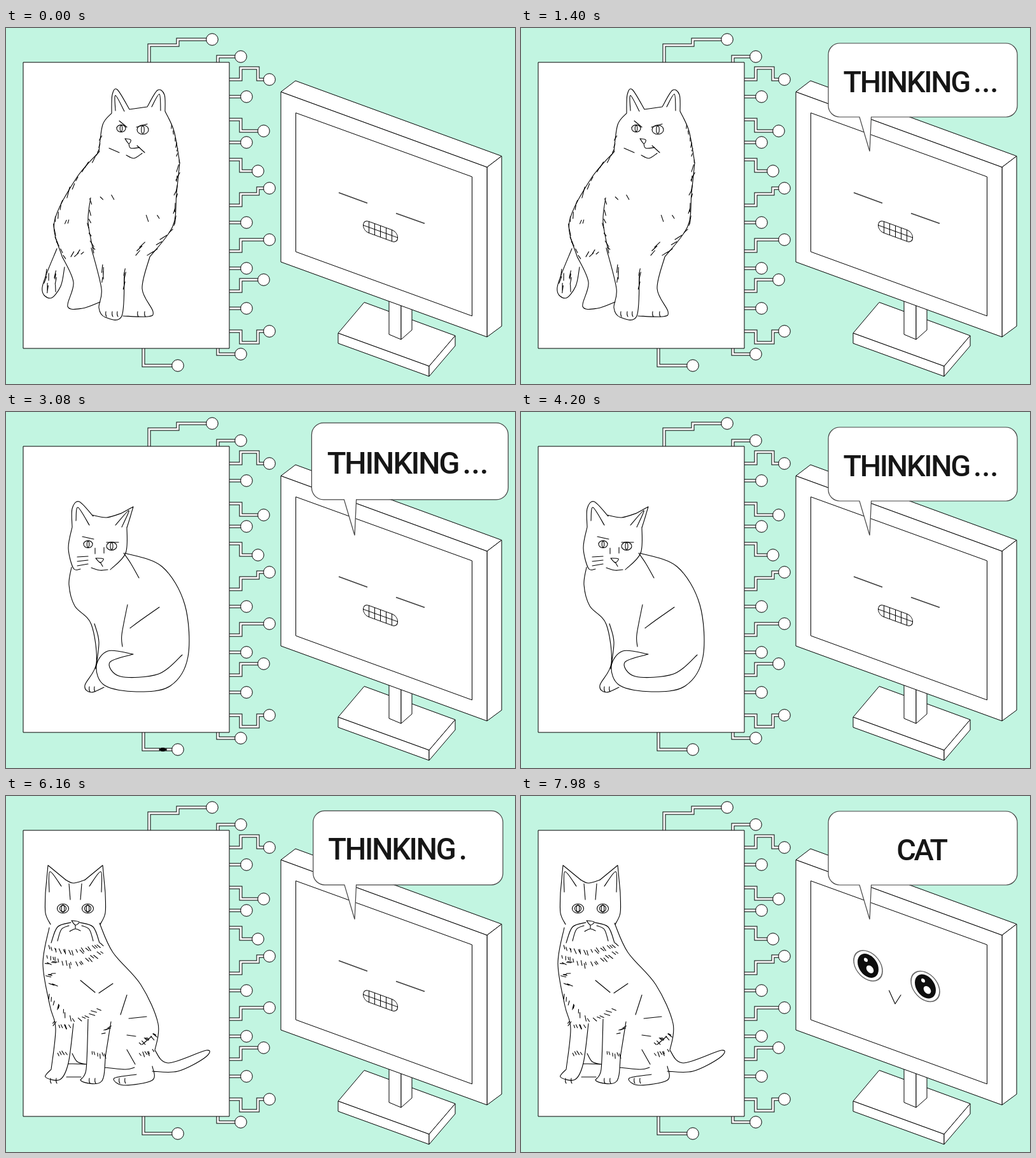
Animation of 800x560 px, one loop 8000 ms. Source, as an HTML page:

```html
<!DOCTYPE html>
<html lang="en">
<head>
<meta charset="utf-8">
<title>Thinking computer</title>
<style>
  html, body { margin: 0; width: 100%; height: 100%; overflow: hidden; background: #c2f5e1; }
  svg { display: block; width: 800px; height: 560px; }
  .ink { fill: none; stroke: #000; stroke-width: 1.1; stroke-linecap: round; stroke-linejoin: round; }
  .solid { fill: #fff; stroke: #000; stroke-width: 1; stroke-linejoin: round; }
  text { font: 500 47px Roboto, "Liberation Sans", sans-serif; fill: #161616; }
</style>
</head>
<body>
<svg viewBox="0 0 800 560">
  <rect width="800" height="560" fill="#c2f5e1"/>
  <g id="circuits"></g>
  <rect class="solid" x="27" y="54" width="324" height="450"/>
  <g id="cats" class="ink"></g>

  <g class="solid">
    <path d="M522 480L563 431.500L706 484L665 532Z"/>
    <path d="M522 480V496L665 548V532Z"/>
    <path d="M706 484V500L665 548V532Z"/>
    <path d="M602 425V482L621 490V430Z"/>
    <path d="M621 430V490L638 475V440Z"/>
    <path d="M432 100.500L455 83L779 201.500L756 219Z"/>
    <path d="M756 219L779 201.500V469L756 486Z"/>
    <path d="M432 100.500L756 219V486L432 368Z"/>
    <path d="M455.500 133.500L732.500 234V453L455.500 352Z"/>
  </g>

  <g id="asleep">
    <path d="M523 259L568 275.500M613 291.500L658 307.500" stroke="#3c3c3c" stroke-width="1.600"/>
    <g id="mouth" class="solid">
      <rect x="-27" y="-9" width="54" height="18" rx="8.500"/>
      <path d="M-27 0H27M-18 -9V9M-9 -9V9M0 -9V9M9 -9V9M18 -9V9"/>
    </g>
  </g>
  <g id="awake">
    <g id="eyes"></g>
    <path class="ink" d="M578.500 306L588 327L597 313"/>
  </g>

  <g id="bubble">
    <path fill="#fff" stroke="#444" stroke-width="1.200" d="M501 24H762a18 18 0 0 1 18 18V122a18 18 0 0 1 -18 18H550.500L548 194L532 140H501a18 18 0 0 1 -18 -18V42a18 18 0 0 1 18 -18Z"/>
    <g id="thinking">
      <text x="506.500" y="100.500" letter-spacing="-2.300">THINKING</text>
      <text id="dots" x="711" y="100.500"></text>
    </g>
    <text id="answer" x="629" y="100.500" text-anchor="middle" letter-spacing="-3.500">CAT</text>
  </g>
</svg>
<script>
const $ = id => document.getElementById(id);
const show = (node, on) => { node.style.display = on ? '' : 'none'; };
const svgNode = (tag, attrs) => {
  const node = document.createElementNS('http://www.w3.org/2000/svg', tag);
  for (const key in attrs) node.setAttribute(key, attrs[key]);
  return node;
};

let seed = 7;
const random = () => (seed = seed * 16807 % 2147483647) / 2147483647;

// Smooth line through a few key points.
function curve(text) {
  const n = text.trim().split(/\s+/).map(Number);
  const p = n.flatMap((x, i) => i % 2 ? [] : [[x, n[i + 1]]]);
  let d = `M${p[0]}`;
  for (let i = 0; i < p.length - 1; i++) {
    const a = p[i - 1] || p[i], b = p[i], c = p[i + 1], e = p[i + 2] || c;
    d += `C${b.map((v, k) => v + (c[k] - a[k]) / 6)} ${c.map((v, k) => v - (e[k] - b[k]) / 6)} ${c}`;
  }
  return d;
}
const draft = d => `<path d="${d}"/>`;
const lines = text => draft(text.split('|').map(curve).join(''));

// Short hairs growing along a line, turned from its direction by an angle.
function hairs(text, gap, size, turn) {
  let d = '';
  for (const stroke of text.split('|')) {
    const path = svgNode('path', { d: curve(stroke) }), length = path.getTotalLength();
    for (let s = gap * random(); s < length; s += gap * (.6 + .8 * random())) {
      const a = path.getPointAtLength(s), b = path.getPointAtLength(s + 1);
      const angle = Math.atan2(b.y - a.y, b.x - a.x) + turn * Math.PI / 180 + random() * .4 - .2;
      const r = size * (.6 + .6 * random());
      d += `M${a.x + 4 * random() - 2} ${a.y + 4 * random() - 2}l${r * Math.cos(angle)} ${r * Math.sin(angle)}`;
    }
  }
  return draft(d);
}
const oval = (x, y, rx, ry) => `<ellipse cx="${x}" cy="${y}" rx="${rx}" ry="${ry}"/>`;
const eye = (x, y, r) => oval(x, y, r, r * .8) + oval(x, y, r * .25, r * .65);
const toes = (y, ...xs) => draft(xs.map(x => `M${x} ${y}q-1 5 1 8`).join(''));

function longhairCat() {
  const back = '147 194 110 237 76 305 88 359', flank = '273 212 268 260 262 312 226 360';
  const cheeks = '150 162 146 194|258 148 267 180 273 212', chest = '133 267 129 305 138 354';
  return lines(`166 134 167 105 175 97 194 128|172 130 172 106 186 131|222 124 238 98 249 105 250 131
    |229 124 241 104 243 130|194 128 208 126 222 124|166 134 152 152 146 194|250 131 264 162 273 212
    |178 146 190 156|205 156 222 151|187 174 196 176 193 182 187 174|193 182 196 189 210 188
    |189 200 201 205 214 197|162 189 178 196|206 185 218 196`)
    + lines(`${back}|${flank}|${chest}|88 359 106 400 97 438 120 441 148 431|80 347 57 408 70 425 86 406 92 376
    |134 346 150 410 146 440 156 455 182 453 186 385|226 360 214 410 231 446 222 454 184 453`)
    + hairs(back, 11, 10, -14) + hairs(flank, 10, 12, 12) + hairs(cheeks, 9, 7, 20) + hairs(chest, 13, 9, -20)
    + hairs('222 330 207 354|150 366 153 392|186 372 188 404|66 380 64 412|78 378 78 408', 7, 11, 8)
    + hairs('98 359 126 356|90 312 100 306', 5, 8, -45) + hairs('147 266 172 262|206 294 240 294', 14, 9, 65)
    + toes(446, 157, 167, 175, 207, 218) + eye(181, 158, 7) + eye(215, 160, 9);
}

function shorthairCat() {
  const whiskers = [0, 1, 2].map(i => `112 ${228 + 7 * i} 129 ${227 + 6 * i}`).join('|');
  return lines(`104 181 104 152 115 141 137 164|110 171 113 150 131 178|135 162 158 166 182 159|180 160 200 149
    |200 149 195 166 190 182|172 178 193 155 182 181|104 181 98 214 106 246 117 247|190 181 188 222 164 248
    |134 245 148 249 160 248|120 196 138 200|158 205 177 205|141 230 153 231 148 237 141 230
    |148 236 152 243|140 214 140 223|154 213 154 222|${whiskers}`)
    + lines(`103 244 99 272 108 305 134 334 142 395 124 430 134 441 154 433|139 333 146 362 141 404
    |187 222 245 243 281 303 286 385 258 431 205 440 155 430 142 400 160 376 200 381
    |200 381 163 394 180 416 240 412 277 382|185 222 196 238 209 261|191 303 182 350 183 369|241 307 211 328 195 340`)
    + toes(432, 131, 139) + eye(129, 208, 7) + eye(166, 211, 8);
}

function tabbyCat() {
  // Half a face, mirrored about its middle.
  const half = lines(`15 132 43 109|43 109 47 152|41 151 40 119 22 142|47 152 47 184 39 202
    |10 138 8 163|7 199 28 206 38 231|10 204 22 210 28 228`) + eye(19.5, 177, 9) + oval(19.5, 177, 5, 5);
  const face = [1, -1].map(side => `<g transform="translate(109) scale(${side} 1)">${half}</g>`).join('');
  return face + lines(`94 132 106 137 124 132|103 196 115 198 109 203 103 196|109 203 109 209|100 213 109 209 117 212
    |68 207 58 264 69 330 78 366 71 430|147 200 168 246 212 297 239 358 234 400
    |71 430 62 442 85 446 98 420 106 358|129 351 126 430 118 448 150 449 157 405 165 355
    |104 405 112 418 126 422|98 421 126 422|95 442 118 442|155 427 188 430 202 427|190 399 203 422
    |205 438 170 444 185 455 230 447 230 425|234 400 255 420 315 400 312 412 270 433 230 433`)
    + lines('117 290 140 309|168 295 146 310|190 313 180 344|193 350 221 347|190 376 204 378|214 391 229 378')
    + hairs('66 236 108 242 150 230|64 250 108 262 152 242', 5, 7, 65) + hairs('68 312 106 348 146 332', 6, 8, 55)
    + hairs('60 262 74 262|61 282 72 280|63 296 74 296|146 374 160 364', 4, 8, 15)
    + hairs('73 352 80 360|82 362 103 361|78 404 97 402|134 403 156 405|207 388 236 372|208 403 235 400', 4, 7, 70)
    + toes(444, 70, 79, 131, 140, 178, 187);
}
$('cats').innerHTML = [longhairCat, shorthairCat, tabbyCat].map(cat => `<g>${cat()}</g>`).join('');

// Wires lie on a grid and end in a round node.
const GRID = 9;
const wires = {
  top: 'M25 6v-3h5v-1h6', corner: 'M37 6v-1h4', bump: 'M39 9h2v-2h3v2h2', drop: 'M39 16h2v2h4',
  fall: 'M39 23h2v2h3', stairs: 'M39 31h2v-2h3v-1h2', rise: 'M39 39h2v-2h5', lift: 'M39 46h2v-2h4',
  dip: 'M39 53h2v2h3v-2h2', foot: 'M37 56v1h4', bottom: 'M24 56v3h6'
};
for (const row of [12, 20, 34, 42, 49]) wires['plug' + row] = `M39 ${row}h3`;

const pulseParts = {};
for (const [name, cells] of Object.entries(wires)) {
  const d = cells.replace(/-?\d+/g, n => n * GRID);
  const stroke = (color, width) => svgNode('path', { d, fill: 'none', stroke: color, 'stroke-width': width });
  const tube = stroke('#000', 5), pulse = pulseParts[name] = [stroke('#000', 3.5), stroke('#000', 6)];
  const end = tube.getPointAtLength(tube.getTotalLength());
  $('circuits').append(tube, stroke('#fff', 3), ...pulse,
    svgNode('circle', { class: 'solid', cx: end.x, cy: end.y, r: 9.3 }));
}

const PULSE = 350;
const pulses = [
  { name: 'bump', start: 0 }, { name: 'drop', start: 1610 },
  { name: 'bottom', start: 2800 }, { name: 'dip', start: 4410 },
  { name: 'top', start: 5481, from: 5600 }, { name: 'stairs', start: 7070 }
];

$('eyes').innerHTML = [[545.5, 267], [635.5, 299.5]].map(([x, y]) =>
  `<g transform="matrix(1 .362 0 1 ${x} ${y})"><circle r="22.500" fill="#fff" stroke="#666" stroke-width="1.600"/>
  <ellipse rx="16.500" ry="18" fill="#0d0d0d"/><g fill="#fff"><circle class="small" cx="-3.500" cy="-8"/>
  <circle class="large" cx="3" cy="4.500"/></g></g>`).join('');

const STEP = 70, LOOP = 8000, ROUND = 2800, ANSWER = 1540;
const ease = k => { k = Math.min(1, Math.max(0, k)); return k * k * (3 - 2 * k); };
const popScale = t => t <= 280 ? 1.04 * ease(t / 280) : 1.04 - 0.04 * ease((t - 280) / 350);
const shiver = step => Math.round(1 - Math.cos(step * step * Math.PI / 64));

function draw(time) {
  const now = Math.floor(time / STEP) * STEP;
  const t = now % ROUND, beat = Math.floor(t / 140), awake = t >= ANSWER;
  [...$('cats').children].forEach((cat, i) => show(cat, i === Math.floor(now / ROUND)));

  show($('bubble'), t > 0);
  $('bubble').setAttribute('transform', `translate(548 194) scale(${popScale(t)}) translate(-548 -194)`);
  show($('thinking'), !awake);
  show($('answer'), awake);
  $('dots').textContent = '.'.repeat((beat + 1) % 4);

  show($('asleep'), !awake);
  show($('awake'), awake);
  $('mouth').setAttribute('transform', `matrix(1 .362 0 1 588.5 ${320 + shiver(t / STEP)})`);
  const wide = beat % 2 === 0;
  document.querySelectorAll('.small').forEach(c => c.setAttribute('r', wide ? 4.2 : 3));
  document.querySelectorAll('.large').forEach(c => c.setAttribute('r', wide ? 7.3 : 5.8));

  Object.values(pulseParts).flat().forEach(part => show(part, false));
  for (const { name, start, from = start + 1 } of pulses) {
    if (now < from || now >= start + PULSE) continue;
    pulseParts[name].forEach((part, i) => {
      const size = i ? 5 : 12, at = (part.getTotalLength() - GRID) * (now - start) / PULSE;
      show(part, true);
      part.setAttribute('stroke-dasharray', `${size} 999`);
      part.setAttribute('stroke-dashoffset', size / 2 - at);
    });
  }
}

const begin = performance.now();
function tick() {
  draw((performance.now() - begin) % LOOP);
  requestAnimationFrame(tick);
}
tick();
</script>
</body>
</html>
```
